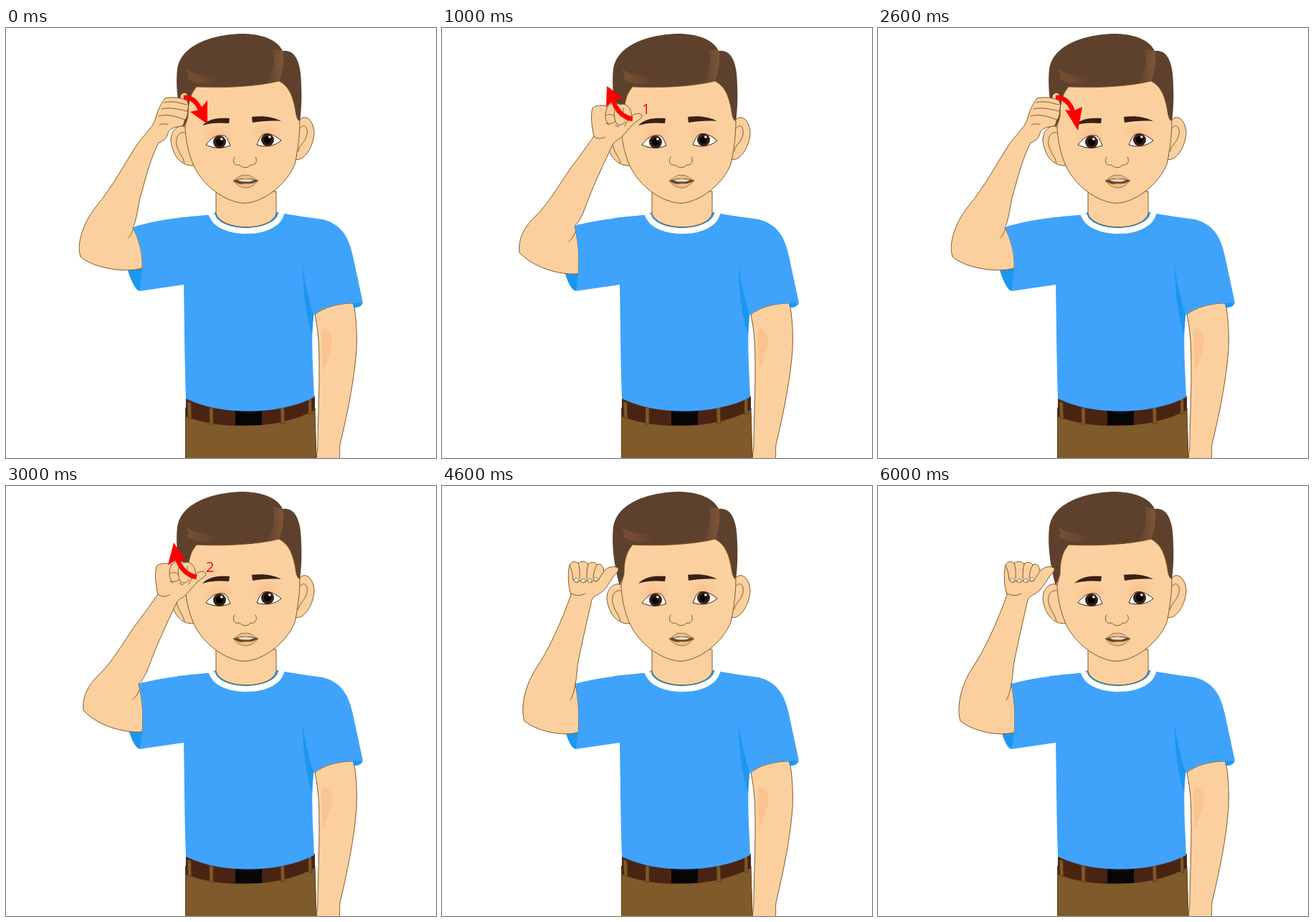
An HTML page for the animation above (7000 ms loop, 600 px wide and 600 px high).

```html
<!DOCTYPE html>
<html lang="en">
<head>
<meta charset="utf-8">
<title>Hand sign at the forehead</title>
<style>
  html, body { margin: 0; width: 100%; height: 100%; overflow: hidden; background: #fff; }
  svg { display: block; width: 100vw; height: 100vh; }
  .skin { fill: #fcd09e; }
  .line { fill: none; stroke: #80592a; stroke-width: 1; stroke-linecap: round; stroke-linejoin: round; }
  .limb { fill: #fcd09e; stroke: #80592a; stroke-width: 1; stroke-linejoin: round; }
  .shirt { fill: #3fa3fb; }
  .fold { fill: #1c97ef; }
  .hair { fill: #5d412d; }
  .dark { fill: #3a2015; }
  .nail { fill: #fff; stroke: #80592a; stroke-width: .8; }
  .shaft { fill: none; stroke: #f00; stroke-width: 6.5; }
  .head { fill: #f00; }
  text { font: 20px "Open Sans", "Noto Sans", sans-serif; fill: #f00; }

  /* Each slot shows for one second out of seven. */
  .slot { visibility: hidden; animation: slot 7s step-end calc(var(--i) * 1s - 7s) infinite; }
  @keyframes slot {
    0% { visibility: visible; }
    14.2857%, 100% { visibility: hidden; }
  }
</style>
</head>
<body>
<svg viewBox="0 0 600 600">
  <defs>
    <radialGradient id="lid">
      <stop offset=".3" stop-color="#f9bd8c" stop-opacity=".6"/>
      <stop offset="1" stop-color="#f9bd8c" stop-opacity="0"/>
    </radialGradient>
    <linearGradient id="lock">
      <stop offset="0" stop-color="#7a5034"/>
      <stop offset="1" stop-color="#5d412d"/>
    </linearGradient>
    <linearGradient id="part">
      <stop offset="0" stop-color="#5d412d"/>
      <stop offset="1" stop-color="#7e5638"/>
    </linearGradient>

    <g id="iris">
      <circle class="dark" r="9"/>
      <circle r="5.2"/>
      <circle cx="2.8" cy="-4" r="1.8" fill="#fff"/>
    </g>

    <!-- Fist turned in, thumb away -->
    <g id="fist">
      <path class="fold" d="M170 338C174 352 181 367 187 367L194 333Z"/>
      <path class="limb" d="M243 98C243 91 250 88 253 93L254 102Z"/>
      <path class="limb" d="M190 335C170 342 122 336 104 319C98 300 108 272 125 250C150 220 166 188 184 161C196 145 205 138 208 128C211 117 215 107 222 98C231 96 244 97 251 100C255 104 255 111 253 115C254 121 252 126 249 129C249 135 245 138 238 138C231 140 227 142 226 147C224 154 220 158 213 160C200 185 194 214 187 237C182 262 181 272 177 278C186 296 191 315 190 335Z"/>
      <path class="line" d="M178 279C175 287 174 291 170 293M221 104C231 101 240 104 252 107M217 113C229 110 240 113 252 116M213 123C226 119 238 124 250 128M214 136C217 132 222 135 226 134"/>
      <path class="shirt" d="M283 261C230 265 207 269 177 278C186 296 191 315 190 335L187 367L262 356Z"/>
    </g>

    <!-- Thumb on the forehead -->
    <g id="touch">
      <path class="fold" d="M172 343C176 357 182 367 187 367L194 340Z"/>
      <path class="limb" d="M190 343C165 345 128 335 108 313C106 294 115 277 131 262C151 242 165 216 180 195C195 175 205 161 212 151C209 138 207 122 210 112C215 107 226 107 231 110C236 104 243 103 248 107C256 104 262 110 264 118L265 123C268 119 277 118 279 122C279 127 271 130 266 135C258 143 253 151 247 155C242 158 240 160 238 163C225 190 207 229 197 258C193 266 190 272 185 276C190 297 192 318 190 343Z"/>
      <path class="line" d="M190 274C186 287 182 294 177 298M231 110C227 117 227 127 231 133C235 134 240 133 242 130M242 111C239 120 240 128 244 134C249 137 254 134 255 131M253 112C252 120 254 126 259 129M229 122C234 119 239 121 241 124M212 151C216 155 223 155 228 152M265 123C260 128 257 131 255 137"/>
      <path class="line" stroke-width="1.6" d="M229 133L233 135M242 136L247 138"/>
      <path class="shirt" d="M283 261C240 265 211 269 185 276C190 297 192 318 190 343L187 367L262 356Z"/>
    </g>

    <!-- Hand away, thumb out -->
    <g id="away">
      <path class="fold" d="M173 345C177 359 182 367 187 367L194 340Z"/>
      <path class="limb" d="M190 344C165 350 131 341 115 328C109 309 116 278 131 255C150 227 167 188 180 152C176 140 175 122 178 111C180 105 187 104 190 108C194 104 201 105 204 109C208 105 214 106 216 110C221 107 225 111 226 119C231 113 239 111 245 114C248 117 244 121 241 124C236 130 232 139 226 145C218 153 212 152 209 159C203 185 197 211 190 245C188 258 188 268 186 276C190 297 192 318 190 344Z"/>
      <path class="line" d="M186 276C184 288 182 294 179 299M190 108C193 116 192 124 192 129M204 109C202 115 202 123 202 129M216 110C212 118 211 124 211 129M178 111C182 118 182 124 183 130M183 130C184 136 191 136 192 131C194 136 201 136 202 131C204 136 210 136 211 131C214 135 219 133 220 128L226 119M180 150C188 154 195 153 200 150"/>
      <g class="nail">
        <ellipse cx="187.5" cy="131.5" rx="3" ry="2.6"/>
        <ellipse cx="197" cy="132" rx="3" ry="2.6"/>
        <ellipse cx="206" cy="132" rx="2.8" ry="2.6"/>
        <ellipse cx="214.5" cy="130" rx="2.6" ry="2.6"/>
      </g>
      <path class="shirt" d="M283 261C240 265 211 269 186 276C190 297 192 318 190 344L187 367L262 356Z"/>
    </g>

    <path id="down" class="shaft" d="M248 97C260 96 269 106 272 117"/>
    <path id="up" class="shaft" d="M266 127C253 125 244 116 239 102"/>
    <path id="face" d="M250 138C250 151 254 175 262 192C275 220 305 243 333 244.500C360 243 392 218 403 190C407 172 410 150 410 130C404 127 405 117 402 106C398 89 392 80 381 74C350 82 300 84 266 82C257 92 254 105 254 123Z"/>
  </defs>

  <!-- Head -->
  <path class="limb" d="M252 138C240 133 230 143 230 157C232 175 242 193 262 192Z"/>
  <path class="line" d="M249 146C240 144 235 156 239 166C241 175 247 179 249 188"/>
  <path class="limb" d="M409 129C418 118 430 130 430 147C429 165 416 188 402 183Z"/>
  <path class="line" d="M410 140C417 131 423 141 419 152C416 161 409 163 408 172"/>
  <path class="fold" d="M289 259L293 257H379L382 259C372 292 299 292 289 259Z"/>
  <path class="limb" d="M293 228V259C301 284 370 284 377 259V228Z"/>
  <path class="hair" d="M248 139C241 116 236 83 239 57C244 23 290 8 333 8C359 9 379 17 386 32C404 29 412 49 412 80C413 98 412 115 410 132H400L385 90H270L254 125Z"/>
  <path fill="url(#lock)" d="M251 57C262 66 280 66 299 71C288 80 266 81 252 70C257 68 254 63 251 57Z"/>
  <path fill="url(#part)" d="M386 31C389 45 385 62 381 75L362 78C374 61 376 42 372 30Z"/>
  <path class="line" stroke-opacity=".6" d="M386 32C389 46 385 62 381 74"/>
  <use href="#face" class="limb"/>

  <ellipse cx="297" cy="150" rx="23" ry="18" fill="url(#lid)"/>
  <ellipse cx="364" cy="147" rx="22" ry="17" fill="url(#lid)"/>
  <path class="dark" d="M274 136C283 126 298 125 312 126L311 133C298 132 286 132 274 136Z"/>
  <path class="dark" d="M343 124C359 122 373 124 384 130C370 129 356 130 344 132Z"/>
  <path fill="#fff" stroke="#3a2015" d="M279 163C286 153 296 147 306 151C310 155 311 160 313 164C301 169 289 168 279 163Z"/>
  <use href="#iris" x="298" y="159"/>
  <path fill="#fff" stroke="#3a2015" d="M350 163C353 156 355 150 360 148C368 146 377 151 384 157C375 165 362 167 350 163Z"/>
  <use href="#iris" x="365" y="156"/>
  <path class="line" d="M319 180C315 187 319 193 326 191C330 196 338 196 341 191C347 193 352 186 348 180"/>
  <path fill="#f0bd88" stroke="#80592a" stroke-width=".8" d="M317 213C325 209 328 203 334 206C339 203 344 209 352 213C345 220 341 223 334 223C326 222 322 219 317 213Z"/>
  <path fill="#694629" d="M317 213C324 211 329 209 334 210.500C340 209 346 211 352 213C346 217 341 218 334 217C328 219 322 217 317 213Z"/>
  <path fill="#e6dccb" d="M323 212Q334 209.500 346 212Q342 215 334 214.500Q327 215 323 212Z"/>

  <!-- Lowered arm -->
  <path class="limb" d="M431 400C437 428 437 450 437 480C437 520 435 552 435 583L433 601H465C467 593 464 588 467 577C477 535 486 490 489 450C490 427 489 405 485 384C464 384 442 390 431 400Z"/>
  <path fill="#f9c48f" d="M442 419C452 420 457 432 455 442C450 457 445 477 442 478C443 460 437 438 442 419Z"/>

  <!-- Trousers and belt -->
  <path fill="#7f5a2a" stroke="#5d4019" d="M250.500 530H431L433 601H250.500Z"/>
  <path fill="#4a2413" d="M251 515C300 539 380 539 431 513V533C380 561 300 561 251 542Z"/>
  <path fill="#060606" d="M320 533H357V554H320Z"/>
  <g fill="#7f5a2a" stroke="#54361a" stroke-width=".8">
    <path d="M253 521L258 523L259 545L254 543Z"/>
    <path d="M284 530H289V553H284Z"/>
    <path d="M383 530H388L389 552H384Z"/>
    <path d="M422 517L426 515L427 539H422Z"/>
  </g>

  <!-- Shirt -->
  <path class="fold" d="M483 380L498 384C495 389 490 391 485 390Z"/>
  <path class="shirt" d="M283 261C260 263 250 264 240 265L235 340L248 358C249 410 249 460 251 517C298 541 382 541 430 515C429 480 425 440 429 401C442 389 464 383 498 383.500L484 318C478 291 468 274 442 267C425 265 407 262 388 259C380 292 292 292 283 261Z"/>
  <path class="fold" d="M414 330C417 360 425 383 429 401L427 428C418 400 414 368 414 330Z"/>
  <path fill="none" stroke="#fff" stroke-width="8" d="M287.500 260C294 291 377 291 384 259"/>

  <!-- Raised arm, second by second -->
  <g class="slot" style="--i:0">
    <use href="#fist"/><use href="#down"/>
    <path class="head" d="M281 134L257 117L270 114L281 101Z"/>
  </g>
  <g class="slot" style="--i:1">
    <use href="#touch"/><use href="#up"/>
    <path class="head" d="M230 81L252 97L239 102L229 110Z"/>
    <text x="279" y="120">1</text>
  </g>
  <g class="slot" style="--i:2">
    <use href="#fist"/><use href="#down"/>
    <path class="head" d="M279 143L261 114L272 116L285 110Z"/>
  </g>
  <g class="slot" style="--i:3">
    <use href="#touch"/><use href="#up"/>
    <path class="head" d="M234 79L251 104L239 103L226 110Z"/>
    <text x="279" y="120">2</text>
  </g>
  <g class="slot" style="--i:4"><use href="#away"/></g>
  <g class="slot" style="--i:5">
    <use href="#touch"/><use href="#up"/>
    <path class="head" d="M234 79L251 104L239 103L226 110Z"/>
  </g>
  <g class="slot" style="--i:6"><use href="#away"/></g>
</svg>
</body>
</html>
```
